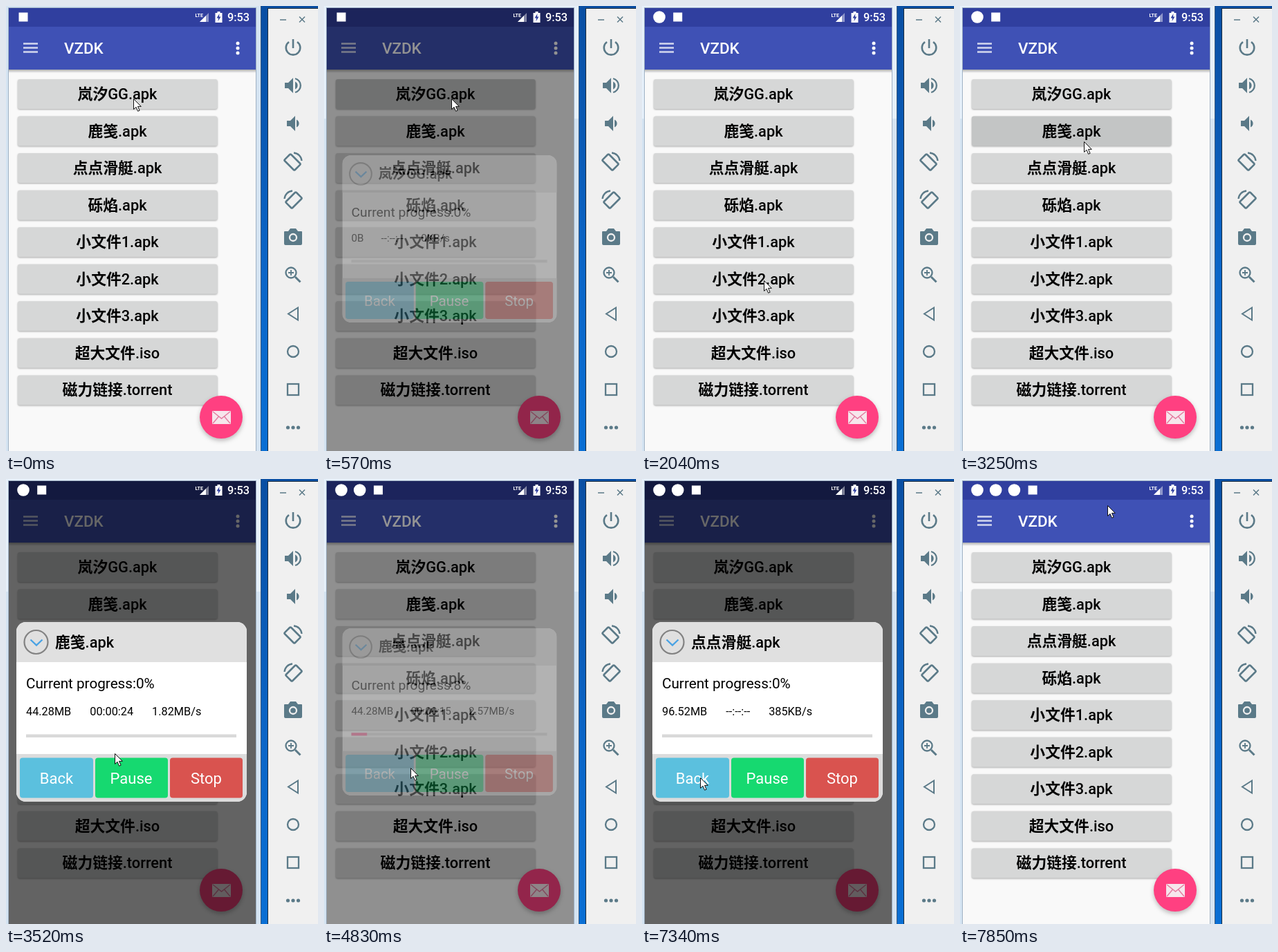
An HTML page that plays this animation: 451 by 644 pixels, repeating every 7990 ms.

```html
<!DOCTYPE html>
<html lang="zh-CN">
<head>
<meta charset="utf-8">
<title>Download demo</title>
<style>
  html, body { margin: 0; width: 100%; height: 100%; overflow: hidden; background: #0a66c2; }
  svg { display: block; width: 451px; height: 644px; }
  text { font-family: Roboto, "Noto Sans CJK SC", "Noto Sans CJK", sans-serif; }
  .label { font-size: 21.8px; font-weight: 500; }
  .han { font-weight: 700; }
  .mid { text-anchor: middle; }
  .key { fill: #d6d7d7; }
  .key.down { fill: #c3c5c5; }
  .act { font-size: 22px; fill: #fff; text-anchor: middle; }
  .raised { filter: drop-shadow(0 1.5px 1px rgba(0, 0, 0, .32)); }
  #tools { fill: none; stroke: #5b7a88; stroke-width: 2.3; }
  #tools .f { fill: #5b7a88; stroke: none; }
</style>
</head>
<body>
<svg viewBox="0 0 451 644">
  <defs>
    <linearGradient id="desk" x2="0" y2="1">
      <stop offset="0" stop-color="#0a4fa3"/><stop offset=".6" stop-color="#0b66c8"/><stop offset="1" stop-color="#0a6fd4"/>
    </linearGradient>
    <linearGradient id="fall" x2="0" y2="1">
      <stop offset="0" stop-opacity=".3"/><stop offset="1" stop-opacity="0"/>
    </linearGradient>
    <clipPath id="round"><rect x="15" y="207" width="333" height="260" rx="14"/></clipPath>
    <clipPath id="screen"><rect x="4" y="3" width="357" height="641"/></clipPath>
  </defs>

  <rect width="451" height="644" fill="url(#desk)"/>
  <rect width="369" height="644" fill="#d5e4f2"/>
  <rect id="glass" width="369" height="163" fill="#e6f0fa"/>
  <rect x="3" y="2" width="359" height="643" fill="#9fb1c4"/>
  <path d="M368.5 0V644" stroke="#36587e"/>

  <g clip-path="url(#screen)">
    <rect x="4" y="3" width="357" height="641" fill="#f9f9f9"/>
    <rect x="4" y="92" width="357" height="5" fill="url(#fall)"/>
    <rect x="4" y="30" width="357" height="62" fill="#3f51b5"/>
    <rect x="4" y="3" width="357" height="27" fill="#303f9f"/>
    <path d="M25 54.5h21M25 60.5h21M25 66.5h21" stroke="#d3d7ee" stroke-width="2.4"/>
    <text x="84" y="69" font-size="22.4" font-weight="500" fill="#fff">VZDK</text>
    <g fill="#fff"><circle cx="335" cy="54" r="2.5"/><circle cx="335" cy="61" r="2.5"/><circle cx="335" cy="68" r="2.5"/></g>
    <g id="list"></g>
    <circle cx="311" cy="595" r="31" fill="#ff4081" style="filter:drop-shadow(0 3px 3px rgba(0,0,0,.25))"/>
    <rect x="298" y="586" width="27" height="19" rx="1" fill="#f6e6ec"/>
    <path d="M299 587l12.500 10 12.500-10M299 604l8.500-10M324 604l-8.500-10" fill="none" stroke="#e47a9f" stroke-width="1.4"/>
    <rect id="dim" x="4" y="3" width="357" height="641"/>

    <g fill="#fff">
      <g id="notes"></g>
      <rect id="badge" x="-6.500" y="9.500" width="13" height="13"/>
      <text x="273.500" y="15.500" font-size="7" font-weight="700">LTE</text>
      <path d="M293 10V23H280z" opacity=".45"/><path d="M289 14V23H280z"/>
      <path d="M302.500 10h3v-2h4v2h3v14h-10z"/>
      <path d="M308.500 11l-4 6.500h2.500l-.5 4.500 4-6.500h-2.500z" fill="#303f9f"/>
      <text x="320" y="22" font-size="16.300" font-weight="500">9:53</text>
    </g>

    <g id="dialog">
      <g clip-path="url(#round)">
        <rect x="15" y="207" width="333" height="260" fill="#fff"/>
        <rect x="15" y="207" width="333" height="58" fill="#e0e0e0"/>
        <rect x="15" y="398" width="333" height="69" fill="#dcdcdc"/>
      </g>
      <circle cx="43.500" cy="236" r="17" fill="none" stroke="#828282" stroke-width="2.2"/>
      <path d="M35.500 232.500l8.500 8 8.500-8" fill="none" stroke="#4aa3e4" stroke-width="2.4"/>
      <text id="name" class="label" x="71" y="244"></text>
      <text id="pct" x="29" y="303" font-size="20.700"></text>
      <text y="341.500" font-size="16.300"><tspan id="size" x="29"></tspan><tspan id="left" dx="27"></tspan><tspan id="rate" dx="27"></tspan></text>
      <rect x="29" y="369.500" width="304" height="4.500" fill="#d9d9d9"/>
      <rect id="bar" x="29" y="369.500" height="4.500" fill="#ff4081"/>
      <rect id="back" x="20" y="403.500" width="106" height="58" rx="4"/>
      <rect x="129" y="403.500" width="105" height="58" rx="4" fill="#16d970"/>
      <rect x="237" y="403.500" width="105" height="58" rx="4" fill="#d9534f"/>
      <text class="act" x="73" y="441">Back</text>
      <text class="act" x="181" y="441">Pause</text>
      <text class="act" x="289.500" y="441">Stop</text>
    </g>
  </g>

  <rect x="378" y="3" width="74" height="642" fill="#1b2c3d"/>
  <rect x="379" y="4" width="73" height="641" fill="#f0f0f0"/>
  <g id="tools">
    <path d="M396 20h9M424 15.500l8 8M432 15.500l-8 8" stroke-width="1.500"/>
    <g transform="translate(415 60)"><path d="M-6-8A10.300 10.300 0 1 0 6-8M0-12V1" stroke-width="2.600"/></g>
    <g transform="translate(415 115)"><path class="f" d="M-12-4h5l7-7v22l-7-7h-5zM3-5.500a6 6 0 0 1 0 11z"/><path d="M3-10a10.300 10.300 0 0 1 0 20"/></g>
    <g transform="translate(415 170)"><path class="f" d="M-9-4h5l7-7v22l-7-7h-5zM5-5.500a6 6 0 0 1 0 11z"/></g>
    <g id="turn" transform="translate(415 225)"><rect x="-6.500" y="-10.500" width="13" height="21" rx="1.500" transform="translate(-1 1) rotate(-45)" stroke-width="2.600"/><path d="M1-12.500A12.500 12.500 0 0 1 12.500-1"/></g>
    <use href="#turn" transform="translate(830 55) scale(-1 1)"/>
    <g transform="translate(415 334)"><path class="f" d="M-12-8h5l3-4h8l3 4h5q1 0 1 1v17q0 2-2 2h-22q-2 0-2-2V-7q0-1 1-1z"/><circle cy="1" r="5" fill="#5b7a88" stroke="#f0f0f0"/></g>
    <g transform="translate(415 389)"><circle cx="-3" cy="-3" r="7.500"/><path d="M3 3l7.500 7.500" stroke-width="3"/><path d="M-3-7v8M-7-3h8" stroke-width="1.800"/></g>
    <path d="M422 436.500L408 445.500l14 9z" stroke-width="2"/>
    <circle cx="415" cy="500" r="8"/>
    <rect x="407" y="547" width="16" height="16"/>
    <g class="f"><circle cx="407.500" cy="610" r="2.600"/><circle cx="415" cy="610" r="2.600"/><circle cx="422.500" cy="610" r="2.600"/></g>
  </g>

  <path id="cursor" d="M.5.500V15.500l3.500-3.200 2.600 6 2.500-1.100-2.600-5.800h4.800z" fill="#fff" stroke="#111" stroke-width="1"/>
</svg>

<script>
const LOOP = 7990, FADE = 240;
const $ = id => document.getElementById(id);
const clamp = v => Math.max(0, Math.min(1, v));

const files = ['岚汐GG.apk', '鹿笺.apk', '点点滑艇.apk', '砾焰.apk', '小文件1.apk',
  '小文件2.apk', '小文件3.apk', '超大文件.iso', '磁力链接.torrent'];
const label = name => name.replace(/\p{Script=Han}+/u, '<tspan class="han">$&</tspan>');

// Runs of evenly spaced screen updates: first, last, count
const runs = [[0, 150, 2], [420, 1410, 8], [1530, 1800, 3], [1920, 2040, 2], [2160, 2550, 4],
  [2820, 2820, 1], [3250, 3520, 3], [3640, 4290, 6], [4440, 4830, 4], [4950, 5340, 4],
  [5620, 5880, 3], [6030, 6610, 5], [6760, 7060, 3], [7340, 7850, 5]];
const ticks = runs.flatMap(([a, b, n]) =>
  Array.from({ length: n }, (_, i) => Math.round(a + (b - a) * i / Math.max(1, n - 1))));

// Pointer path: time, x, y
const path = [[0, 184, 134], [703, 184, 134], [1130, 130, 330], [1410, 104, 427], [1800, 98, 430],
  [1920, 120, 424], [2040, 176, 397], [2550, 179, 196], [3250, 179, 196], [3520, 157, 397],
  [3770, 112, 428], [4290, 100, 430], [4700, 108, 428], [4830, 125, 418], [5340, 190, 240],
  [5620, 190, 240], [5880, 190, 358], [6180, 110, 426], [6610, 85, 432], [7060, 82, 433],
  [7595, 85, 432], [7850, 213, 38]];

// Rows: time, percent, size, time left, rate
const idle = ['0B', '--:--:--', '0KB/s'];
const dialogs = [
  { open: 440, gone: 2040, rows: [[0, 0, ...idle], [980, 2, '44.84MB', '00:00:19', '2.27MB/s'],
    [1400, 9, '44.84MB', '00:00:09', '4.31MB/s'], [1660, 16, '44.84MB', '00:00:06', '5.53MB/s']] },
  { open: 3270, gone: 4950, rows: [[0, 0, '44.28MB', '00:00:24', '1.82MB/s'],
    [4020, 4, '44.28MB', '00:00:19', '2.21MB/s'], [4560, 8, '44.28MB', '00:00:15', '2.57MB/s']] },
  { open: 5640, gone: 7720, rows: [[0, 0, ...idle], [6900, 0, '96.52MB', '--:--:--', '385KB/s']] }
];

$('list').innerHTML = files.map((f, i) => {
  const y = 106 + 53.55 * i;
  return `<rect class="key raised" x="17" y="${y}" width="288.5" height="43" rx="3"/>
    <text class="label mid" x="161" y="${y + 29}">${label(f)}</text>`;
}).join('');
$('notes').innerHTML = dialogs.map((_, i) => `<circle cx="${25 + 26.7 * i}" cy="16" r="8.8"/>`).join('');
const keys = document.querySelectorAll('.key');
const notes = document.querySelectorAll('#notes circle');

const lastBefore = (rows, t) => rows.filter(r => r[0] <= t).pop();

function pointer(t) {
  const i = path.findIndex(p => p[0] > t);
  if (i < 0) return path[path.length - 1].slice(1);
  const [a, b] = [path[i - 1], path[i]], k = (t - a[0]) / (b[0] - a[0]);
  return [1, 2].map(n => Math.round(a[n] + (b[n] - a[n]) * k));
}

function draw(t) {
  const [x, y] = pointer(t);
  $('cursor').setAttribute('transform', `translate(${x} ${y})`);
  $('glass').style.display = t < 150 ? 'none' : '';

  const done = dialogs.filter(d => t >= d.gone - 130).length;
  notes.forEach((c, i) => c.style.display = i < done ? '' : 'none');
  $('badge').setAttribute('transform', `translate(${25 + 26.7 * done} 0)`);

  const n = dialogs.findIndex(d => t >= d.open - 20 && t < d.gone);
  keys.forEach((k, i) => k.classList.toggle('down', i === n && t < dialogs[n].open + FADE));
  const d = dialogs[n];
  const p = d ? clamp(Math.min(t - d.open, d.gone - t) / FADE) : 0;
  const alpha = p ** 1.7, scale = .9 + .1 * alpha;
  $('dim').setAttribute('opacity', .6 * Math.sqrt(p));
  $('dialog').setAttribute('opacity', alpha);
  $('dialog').setAttribute('transform', `translate(181.5 337) scale(${scale}) translate(-181.5 -337)`);
  if (!d) return;

  const [, pct, size, left, rate] = lastBefore(d.rows, t);
  const texts = { pct: `Current progress:${pct}%`, size, left, rate };
  for (const id in texts) $(id).textContent = texts[id];
  $('name').innerHTML = label(files[n]);
  $('bar').setAttribute('width', 3.04 * pct);
  $('back').setAttribute('fill', t > d.gone - 370 && t < d.gone - 130 ? '#39b3d7' : '#5bc0de');
}

const start = performance.now();
let shown = -1;
function loop() {
  const t = (performance.now() - start) % LOOP;
  const tick = ticks.filter(k => k <= t).pop();
  if (tick !== shown) draw(shown = tick);
  requestAnimationFrame(loop);
}
loop();
</script>
</body>
</html>
```
